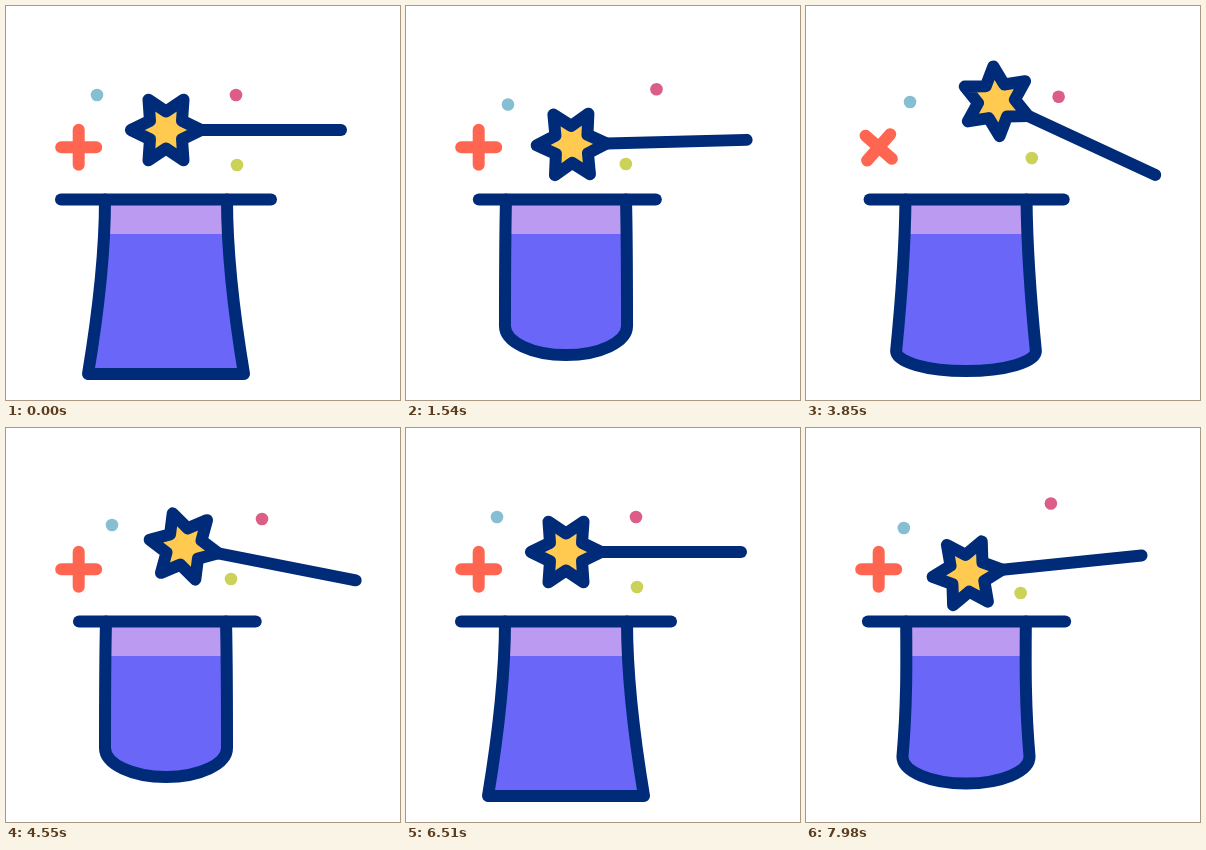
Recreate the animation shown at these times as an HTML page. Size 394x394 px, loop 8 s.

```html
<!DOCTYPE html>
<html lang="en">
<head>
<meta charset="utf-8">
<title>Magic hat</title>
<style>
  html, body { margin: 0; width: 100%; height: 100%; overflow: hidden; background: #fff; }
  svg { display: block; width: 100%; height: 100%; }
  .ink { stroke: #002b78; stroke-width: 12; stroke-linecap: round; stroke-linejoin: round; }
</style>
</head>
<body>
<svg viewBox="0 0 394 394">
  <defs>
    <linearGradient id="cloth" gradientUnits="userSpaceOnUse" x1="0" y1="0" x2="0" y2="457">
      <stop offset=".5" stop-color="#bb9bf1"/>
      <stop offset=".5" stop-color="#6a66f8"/>
    </linearGradient>
  </defs>
  <path id="hat" class="ink" fill="url(#cloth)"/>
  <path id="brim" class="ink"/>
  <path id="plus" d="M-17.5 0H17.5M0-17.5V17.5" stroke="#ff6652" stroke-width="12" stroke-linecap="round"/>
  <circle id="blue" r="6.3" fill="#86bed4"/>
  <circle id="pink" r="6.3" fill="#dc5e87"/>
  <circle id="lime" r="6.3" fill="#cbd258"/>
  <g id="wand" class="ink">
    <path d="M35 0H175"/>
    <path id="star" fill="#ffca4f"/>
  </g>
</svg>
<script>
const LOOP = 8000, CYCLE = 3170, STEP = 70, TOP = 193.5, MIDDLE = 160;
const el = id => document.getElementById(id);

// Smooth rise from 0 to 1 between two times.
function ease(t, from, to) {
  const u = Math.min(1, Math.max(0, (t - from) / (to - from)));
  return u * u * (3 - 2 * u);
}

// Eases from pose to pose, one time span per move, and returns to the first pose.
function follow(t, poses, spans) {
  return poses[0].map((first, k) => spans.reduce((value, span, i) => {
    const next = poses[(i + 1) % poses.length][k];
    return value + (next - poses[i][k]) * ease(t, ...span);
  }, first));
}

// Side of the hat: top x, two handle x, corner x, corner y.
const hatPoses = [[99, 99, 93, 82, 368], [100, 99, 99, 99, 320], [101, 109, 112, 82, 379]];
const hatSpans = [[350, 1030], [1530, 1980], [2450, 2950]];

// Star centre and angle: rest, raised, struck, lifted.
const wandPoses = [[160, 124, 0], [195, 91, 28.6], [161, 146, -6.3], [163, 96, 9]];
const wandSpans = [[200, 820], [1080, 1680], [1980, 2500], [2600, 3000]];

// Each dot: rest, raised, struck.
const dots = {
  blue: [[91, 89], [106, 97], [95, 101]],
  pink: [[230, 89], [256, 91], [241, 70]],
  lime: [[231, 159], [225, 151], [211, 170]]
};
const dotSpans = [[200, 820], [1380, 1770], [2080, 2800]];

function drawHat(t) {
  const [top, a, b, x, y] = follow(t, hatPoses, hatSpans);
  const squash = ease(t, ...hatSpans[0]) - ease(t, ...hatSpans[1]);
  const sag = 29 * Math.sqrt(Math.max(0, squash));
  const mirror = n => 2 * MIDDLE - n;
  const ay = TOP + (y - TOP) * 0.31, by = TOP + (y - TOP) * 0.62;
  const base = sag > 0.1 ? `A${MIDDLE - x} ${sag} 0 0 0 ${mirror(x)} ${y}` : `H${mirror(x)}`;
  el('hat').setAttribute('d', `M${top} ${TOP}C${a} ${ay} ${b} ${by} ${x} ${y}${base}`
    + `C${mirror(b)} ${by} ${mirror(a)} ${ay} ${mirror(top)} ${TOP}`);

  const inset = 18 * (ease(t, 350, 1030) - ease(t, 1530, 1720));
  el('brim').setAttribute('d', `M${55 + inset} ${TOP}H${265 - 0.85 * inset}`);
}

function draw(time) {
  const t = Math.floor(time % LOOP / STEP) * STEP % CYCLE;
  drawHat(t);

  const [x, y, angle] = follow(t, wandPoses, wandSpans);
  el('wand').setAttribute('transform', `translate(${x} ${y}) rotate(${angle})`);

  const turn = 90 * (ease(t, 330, 1070) + ease(t, 1950, 2710));
  el('plus').setAttribute('transform', `translate(72.7 141.3) rotate(${turn})`);

  for (const [id, poses] of Object.entries(dots)) {
    const [cx, cy] = follow(t, poses, dotSpans);
    el(id).setAttribute('cx', cx);
    el(id).setAttribute('cy', cy);
  }
}

const starPoints = Array.from({ length: 12 }, (_, i) => {
  const r = i % 2 ? 18.5 : 35, a = i * Math.PI / 6;
  return `${r * Math.cos(a)} ${r * Math.sin(a)}`;
});
el('star').setAttribute('d', `M${starPoints.join('L')}Z`);

const start = performance.now();
function tick() {
  draw(performance.now() - start);
  requestAnimationFrame(tick);
}
tick();
</script>
</body>
</html>
```
